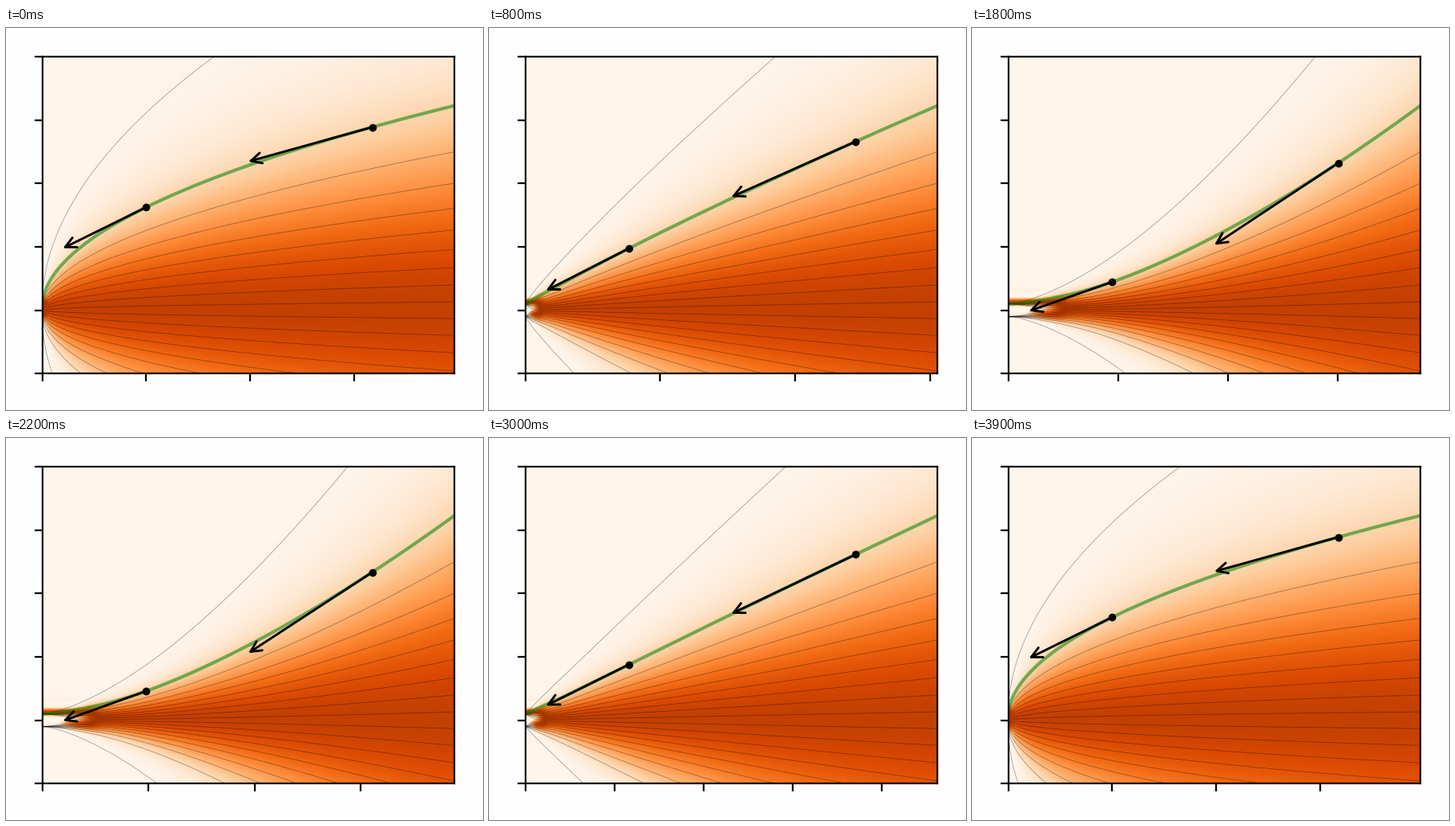
Recreate the animation shown at these times as a matplotlib script. Size 600 px wide and 480 px high, loop 4000 ms.

```python
import math

import matplotlib.pyplot as plt
import numpy as np
from matplotlib.animation import FuncAnimation
from matplotlib.patches import FancyArrowPatch
from matplotlib.ticker import MaxNLocator

W, H, DPI = 600, 480, 200
FRAMES, INTERVAL = 40, 100
S_MAX = 20.0            # noise level at the right edge
Y_MIN, Y_MAX = -10, 40

erf = np.vectorize(math.erf, otypes=[float])


def cdf(y, sigma):
    """Two equal point masses at +1 and -1, blurred by sigma."""
    s = sigma * math.sqrt(2)
    return 0.5 + 0.25 * (erf((y - 1) / s) + erf((y + 1) / s))


def quantile_curve(prob, sigmas):
    lo, hi = np.zeros_like(sigmas), np.full_like(sigmas, 90.0)
    for _ in range(45):
        mid = (lo + hi) / 2
        below = cdf(mid, sigmas) < prob
        lo, hi = np.where(below, mid, lo), np.where(below, hi, mid)
    return (lo + hi) / 2


SIGMAS = np.geomspace(0.02, S_MAX, 300)
PROBS = np.linspace(0.001, 0.999, 20)[10:]
CURVES = [quantile_curve(p, SIGMAS) for p in PROBS]
MAIN = 8                # index of the highlighted trajectory

PHASE = np.radians(np.linspace(3.07, 356.93, FRAMES))
POWERS = 1 - 0.5 * np.cos(PHASE)

U = np.linspace(0, 1, 500) ** 2
COLS = np.linspace(0, 1, 100)
ROWS = np.linspace(Y_MIN, Y_MAX, 60)[:, None]
ARROWS = [(0.251, 0.05), (0.801, 0.5)]   # start and tip along the time axis
locator = MaxNLocator(nbins=5, steps=[1, 2, 2.5, 5, 10])


def noise(u, power):
    return S_MAX * np.maximum(u, 0.002) ** power


def path(k, u, power):
    return np.interp(np.log(noise(u, power)), np.log(SIGMAS), CURVES[k])


def density(power):
    s2 = 2 * noise(COLS, power) ** 2
    log_p = np.logaddexp(-(ROWS - 1) ** 2 / s2, -(ROWS + 1) ** 2 / s2)
    return np.exp(log_p - log_p.max(axis=0))


fig = plt.figure(figsize=(W / DPI, H / DPI), dpi=DPI, facecolor="#fefdff")
x0, y0, x1, y1 = 45.72, 45.72, 564, 444
ax = fig.add_axes([x0 / W, y0 / H, (x1 - x0) / W, (y1 - y0) / H])
image = ax.imshow(density(POWERS[0]), cmap="Oranges", vmin=0, vmax=1.25,
                  origin="lower", extent=(0, 1, Y_MIN, Y_MAX),
                  aspect="auto", interpolation="lanczos")
ax.set_xlim(0, 1)
ax.set_ylim(Y_MIN, Y_MAX)
ax.set_yticks(range(Y_MIN, Y_MAX + 1, 10))
ax.tick_params(labelbottom=False, labelleft=False, length=3.5, width=0.8)

thin = [(k, sign, ax.plot([], [], color="black", lw=0.3, alpha=0.35)[0])
        for k in range(len(PROBS)) for sign in (1, -1)
        if (k, sign) != (MAIN, 1)]
main, = ax.plot([], [], color="green", lw=1.5, alpha=0.55)
dots, = ax.plot([], [], "o", color="black", ms=3.5, mew=0, zorder=5)
arrows = [FancyArrowPatch((0, 0), (1, 1), arrowstyle="->", mutation_scale=12,
                          lw=1.05, color="black", shrinkA=0, shrinkB=0,
                          zorder=4)
          for _ in ARROWS]
for arrow in arrows:
    ax.add_patch(arrow)


def update(i):
    power = POWERS[i]
    image.set_data(density(power))
    for k, sign, line in thin:
        line.set_data(U, sign * path(k, U, power))
    main.set_data(U, path(MAIN, U, power))

    starts = np.array([a for a, _ in ARROWS])
    heights = path(MAIN, starts, power)
    step = 0.01
    slopes = (path(MAIN, starts + step, power)
              - path(MAIN, starts - step, power)) / (2 * step)
    dots.set_data(starts, heights)
    for arrow, (a, b), y, m in zip(arrows, ARROWS, heights, slopes):
        arrow.set_positions((a, y), (b, y + m * (b - a)))

    t_max = S_MAX ** (1 / power)
    ticks = locator.tick_values(0, t_max) / t_max
    ax.set_xticks(ticks[(ticks >= 0) & (ticks <= 1)])
    return [image, main, dots, *arrows]


anim = FuncAnimation(fig, update, frames=FRAMES, interval=INTERVAL,
                     init_func=lambda: update(0), repeat=True, blit=False)
plt.show()
```
